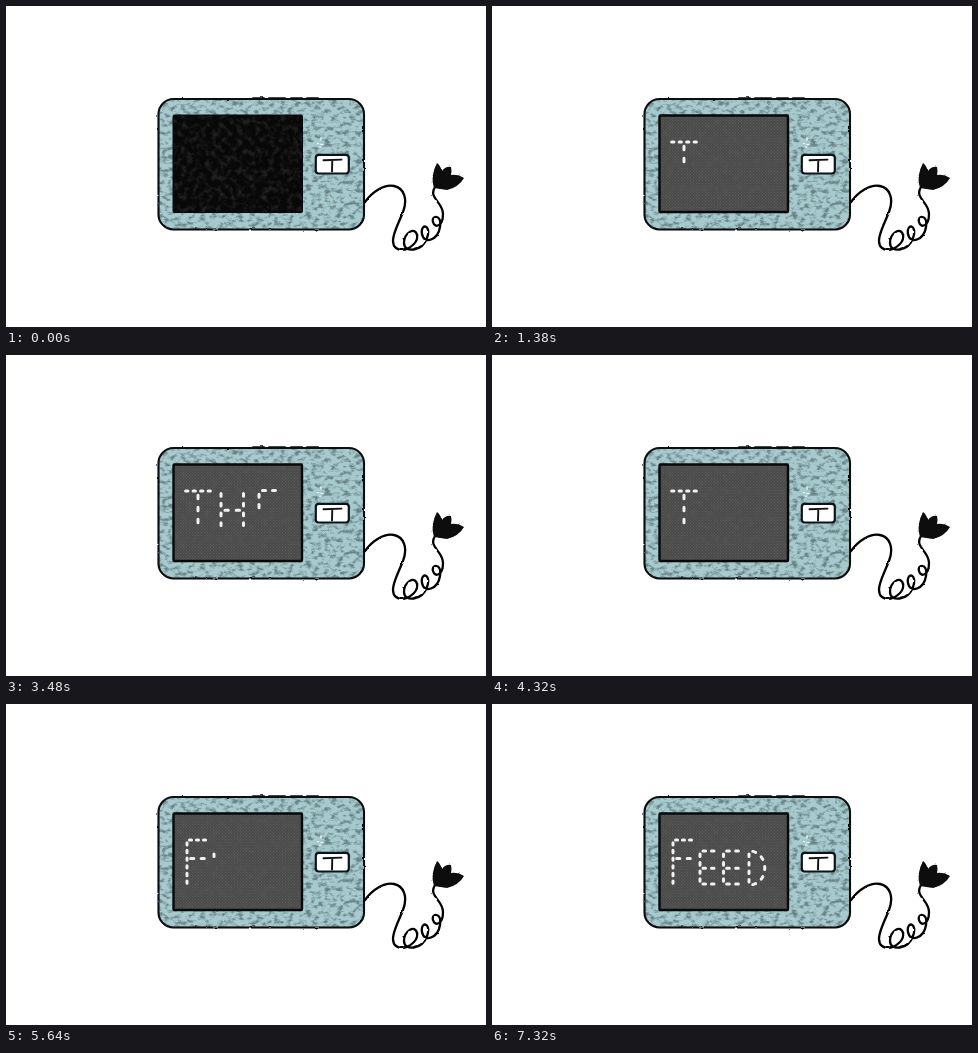
These frames come from a looping animation (480 px wide and 321 px high, 8000 ms). An HTML page:

```html
<!DOCTYPE html>
<html lang="en">
<head>
<meta charset="utf-8">
<title>Display</title>
<style>
html, body { margin: 0; width: 100%; height: 100%; overflow: hidden; background: #fff; }
svg { display: block; }
</style>
</head>
<body>
<svg width="480" height="321" viewBox="0 0 480 321" fill="none" stroke-linecap="round" stroke-linejoin="round">
  <defs>
    <filter id="chalk" x="0" y="0" width="1" height="1" color-interpolation-filters="sRGB">
      <feTurbulence type="fractalNoise" baseFrequency=".16 .24" numOctaves="4" seed="8"/>
      <feColorMatrix values="0 0 0 0 .26  0 0 0 0 .34  0 0 0 0 .36  0 0 0 3.5 -1.6"/>
      <feComposite in2="SourceGraphic" operator="in"/>
    </filter>
    <filter id="dust" x="0" y="0" width="1" height="1" color-interpolation-filters="sRGB">
      <feTurbulence type="fractalNoise" baseFrequency=".16" numOctaves="4" seed="3"/>
      <feColorMatrix values="0 0 0 0 .4  0 0 0 0 .4  0 0 0 0 .4  0 0 0 2.5 -1.1"/>
      <feComposite in2="SourceGraphic" operator="in"/>
    </filter>
    <filter id="rough" x="-.05" y="-.05" width="1.1" height="1.1">
      <feTurbulence type="fractalNoise" baseFrequency=".15" numOctaves="2" seed="5"/>
      <feDisplacementMap in="SourceGraphic" scale="2" xChannelSelector="R" yChannelSelector="A"/>
    </filter>
    <pattern id="mesh" width="3" height="3" patternUnits="userSpaceOnUse">
      <path d="M0 0h1v1h-1zM1.5 1.5h1v1h-1z" fill="#666"/>
    </pattern>
    <rect id="body" x="152.500" y="93" width="205.500" height="130.500" rx="15"/>
    <rect id="screen" x="167.500" y="109.500" width="128.500" height="96.500" rx="1"/>
  </defs>

  <use href="#body" fill="#a6cacd"/>
  <use href="#body" fill="#000" filter="url(#chalk)" opacity=".6"/>
  <g stroke="#080c0d" stroke-width="2.100" filter="url(#rough)">
    <use href="#body"/>
    <path d="M247 92.300H312" stroke-dasharray="11 5 16 6"/>
  </g>

  <g id="off">
    <use href="#screen" fill="#080808" stroke="#080808" stroke-width="2"/>
    <use href="#screen" fill="#000" filter="url(#dust)" opacity=".3"/>
  </g>
  <g id="on">
    <use href="#screen" fill="#4a4a4a"/>
    <use href="#screen" fill="url(#mesh)" opacity=".6"/>
    <use href="#screen" fill="#000" filter="url(#dust)" opacity=".2"/>
    <use href="#screen" stroke="#080808" stroke-width="2.400"/>
  </g>
  <g id="text" stroke="#f1f1ee" stroke-width="3"></g>

  <rect x="309.800" y="148.800" width="33" height="18.700" rx="3" fill="#fff" stroke="#0b1418" stroke-width="2.200"/>
  <path d="M317.500 154.200L335.500 153.600M326.300 154L326 165.500" stroke="#111" stroke-width="1.900"/>
  <path d="M315 132v2M311.500 137.500h1M315 138.500h2M314 141v.5" stroke="#eef6f6" stroke-width="1.300"/>

  <g filter="url(#rough)">
    <path d="M359 196C366 186 378 178 388 180S402 193 397 206S382 236 390 242S413 238 411 229S398 227 398 237S416 246 421 232S414 217 416 228S432 234 434 221S425 209 427 216S437 220 437 208S422 192 429 181" stroke="#000" stroke-width="2.300"/>
    <path d="M428 182Q424 170 431 157Q434 159 436 165Q440 160 445 161Q446 165 445 169Q452 168 458 172Q453 181 441 184Z" fill="#080808"/>
  </g>
</svg>
<script>
const LOOP = 8000, STEP = 60;
const byId = id => document.getElementById(id);

// Strokes in writing order: column-row pairs on a 3 x 3 grid (two make a line,
// four a curve), then the number of dashes.
const glyphs = {
  T: "00-20:4 10-12:3",
  H: "00-02:4 01-21:2 20-22:4",
  E: "00-01:2 00-20:2 01-02:2 01-21:2 02-22:2",
  F: "00-02:6 00-20:3 01-21:2",
  D: "00-02:4 00-20-22-02:5"
};

function letter(name, x, y, w, h, mid = .52) {
  const rows = [0, mid, 1];
  const place = ([col, row]) => `${x + w * col / 2} ${y + h * rows[row]}`;
  return glyphs[name].split(" ").map(stroke => {
    const [route, count] = stroke.split(":");
    const [first, ...rest] = route.split("-").map(place);
    const path = document.createElementNS("http://www.w3.org/2000/svg", "path");
    path.setAttribute("d", `M${first}${rest.length > 1 ? "C" : "L"}${rest.join(" ")}`);
    path.setAttribute("pathLength", count);
    path.setAttribute("stroke-dashoffset", -.35);
    byId("text").append(path);
    return { path, count: +count };
  });
}

const the = [
  letter("T", 177, 136, 30, 36),
  letter("H", 215, 135, 22.5, 39),
  letter("E", 253, 135.5, 20, 40)
].flat();
const feed = [
  letter("F", 181, 136, 21, 46, .4),
  letter("E", 208, 147, 17, 33),
  letter("E", 231.5, 147, 18, 33),
  letter("D", 257, 147, 21, 34)
].flat();

const total = word => word.reduce((sum, stroke) => sum + stroke.count, 0);
const steps = (t, start, word) =>
  Math.max(0, Math.min(total(word), Math.floor((t - start) / STEP) + 1));

// Shows the first n dashes of a word.
function reveal(word, n) {
  for (const { path, count } of word) {
    const shown = Math.max(0, Math.min(count, n));
    path.style.display = shown ? "" : "none";
    path.setAttribute("stroke-dasharray", ".3 .7 ".repeat(Math.max(0, shown - 1)) + ".3 99");
    n -= count;
  }
}

function draw(now) {
  const t = now % LOOP;
  const n1 = steps(t, 1080, the) - steps(t, 3180, the);
  const n2 = steps(t, 4980, feed);
  reveal(the, n1);
  reveal(feed, n2);
  const lit = n1 + n2 > 0;
  byId("on").style.display = lit ? "" : "none";
  byId("off").style.display = lit ? "none" : "";
}

let begin;
function frame(now) {
  begin ??= now;
  draw(now - begin);
  requestAnimationFrame(frame);
}
draw(0);
requestAnimationFrame(frame);
</script>
</body>
</html>
```
